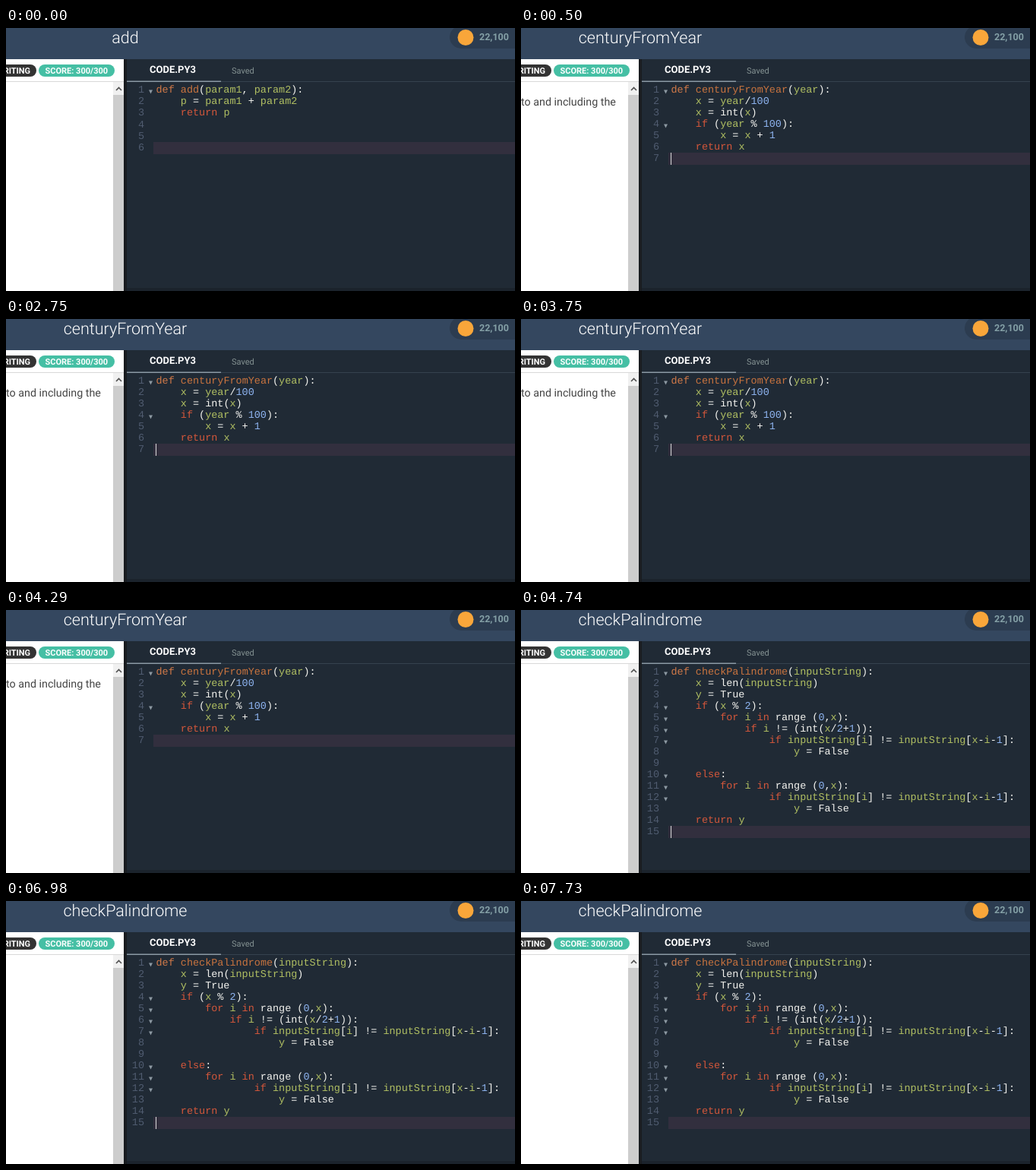
Animation, 670 px wide and 346 px high, one loop 8000 ms. Source, as an HTML page:

```html
<!DOCTYPE html>
<html lang="en">
<head>
<meta charset="utf-8">
<style>
  html, body { margin: 0; width: 100%; height: 100%; overflow: hidden; background: #202a35; }
  svg { display: block; width: 670px; height: 346px; font-family: Roboto, sans-serif; text-rendering: geometricPrecision; }
  .code { font: 13.47px "Liberation Mono", monospace; }
  .bold { font-weight: 700; }
  .keyword { fill: #d4573b; }
  .def { fill: #d27a49; }
  .name { fill: #c9743f; }
  .ident { fill: #b0bf62; }
  .number { fill: #8fb5f2; }
  .plain { fill: #f4f4f0; }
  .gutter { fill: #505c70; text-anchor: end; }
</style>
</head>
<body>
<svg viewBox="0 0 670 346">
  <rect width="670" height="346" fill="#202a35"/>
  <rect y="342" width="670" height="4" fill="#1b232c"/>

  <!-- header -->
  <rect width="670" height="41" fill="#34475f"/>
  <text id="title" x="157" y="20" text-anchor="middle" font-size="21.5" font-weight="300" fill="#fff"/>
  <rect x="584" y="-3" width="110" height="30" rx="15" fill="#2c3c50"/>
  <circle cx="605" cy="12.5" r="10.5" fill="#f9a63a"/>
  <text class="bold" x="623" y="16" font-size="12.5" fill="#84a0a6">22,100</text>

  <!-- task panel -->
  <rect y="41" width="155" height="305" fill="#fff"/>
  <rect y="70" width="155" height="1" fill="#d8d8d8"/>
  <rect x="-30" y="48" width="70" height="16" rx="8" fill="#333"/>
  <text class="bold" x="32" y="60" text-anchor="end" font-size="11" fill="#fff">WRITING</text>
  <rect x="43" y="48" width="100" height="16" rx="8" fill="#45bfa4"/>
  <text class="bold" x="51.5" y="60" font-size="11" fill="#fff">SCORE: 300/300</text>
  <text id="task" x="0" y="102" font-size="14.3" fill="#444"/>
  <rect x="141" y="71" width="14" height="17" fill="#f0f0f0"/>
  <rect x="141" y="88" width="14" height="258" fill="#cdcdcd"/>
  <path d="M145 82l3.5-3.5 3.5 3.5" fill="none" stroke="#505050" stroke-width="1.6"/>
  <rect x="155" y="41" width="4" height="305" fill="#191c20"/>

  <!-- editor tabs -->
  <rect x="159" y="70" width="511" height="1" fill="#35424e"/>
  <rect x="159" y="69.5" width="124" height="1.5" fill="#8b9aa5"/>
  <text class="bold" x="189" y="59" font-size="13" fill="#fff">CODE.PY3</text>
  <text x="297" y="60" font-size="11" fill="#849292">Saved</text>

  <g id="editor" class="code"></g>
  <rect id="cursor" x="197" width="1" height="16" fill="#dadada"/>
</svg>
<script>
const LOOP = 8000, LEFT = 197.5, TOP = 74, CHAR = 8.08;

const scenes = [
  { start: 0, title: "add", task: "", pitch: 15.2, blinks: [], code:
`def add(param1, param2):
    p = param1 + param2
    return p


` },
  { start: 500, title: "centuryFromYear", task: "to and including the", pitch: 15,
    blinks: [500, 1000, 1750, 2250, 2750, 3250, 3750, 4290], code:
`def centuryFromYear(year):
    x = year/100
    x = int(x)
    if (year % 100):
        x = x + 1
    return x
` },
  { start: 4740, title: "checkPalindrome", task: "", pitch: 15,
    blinks: [4740, 5240, 5740, 6480, 6980, 7730], code:
`def checkPalindrome(inputString):
    x = len(inputString)
    y = True
    if (x % 2):
        for i in range (0,x):
            if i != (int(x/2+1)):
                if inputString[i] != inputString[x-i-1]:
                    y = False

    else:
        for i in range (0,x):
                if inputString[i] != inputString[x-i-1]:
                    y = False
    return y
` }
];

const byId = id => document.getElementById(id);

function tokenClass(word, previous) {
  if (word === "def") return "def";
  if (previous === "def") return "name";
  if (/^(return|if|for|in|else)$/.test(word)) return "keyword";
  if (/^\d/.test(word)) return "number";
  if (/^(int|len|range|True|False)$/.test(word) || /^\W/.test(word)) return "plain";
  return "ident";
}

function renderLine(line, row, pitch) {
  const top = Math.round(TOP + row * pitch), base = top + 11;
  let previous = "";
  let out = `<text class="gutter" x="182" y="${base}">${row + 1}</text>`;
  // Lines that open a block get a fold arrow.
  if (line.endsWith(":")) out += `<path d="M188 ${top + 7.5}h5l-2.5 5z" fill="#8d99a3"/>`;
  for (const { 0: word, index } of line.matchAll(/\w+|[^\w\s]+/g)) {
    out += `<text class="${tokenClass(word, previous)}" x="${LEFT + index * CHAR}" y="${base}">${word}</text>`;
    previous = word;
  }
  return out;
}

function showScene({ title, task, pitch, code }) {
  const lines = code.split("\n");
  const activeTop = Math.round(TOP + (lines.length - 1) * pitch);
  byId("title").textContent = title;
  byId("task").textContent = task;
  byId("editor").innerHTML =
    `<rect x="194" y="${activeTop}" width="476" height="16" fill="#322f3e"/>` +
    lines.map((line, row) => renderLine(line, row, pitch)).join("");
  byId("cursor").setAttribute("y", activeTop);
}

let current;
function draw(now) {
  const time = now % LOOP;
  const scene = scenes.findLast(s => s.start <= time);
  if (scene !== current) showScene(current = scene);
  const toggles = scene.blinks.filter(t => t <= time).length;
  byId("cursor").setAttribute("visibility", toggles % 2 ? "visible" : "hidden");
}

const origin = performance.now();
function tick() {
  draw(performance.now() - origin);
  requestAnimationFrame(tick);
}
tick();
</script>
</body>
</html>
```
